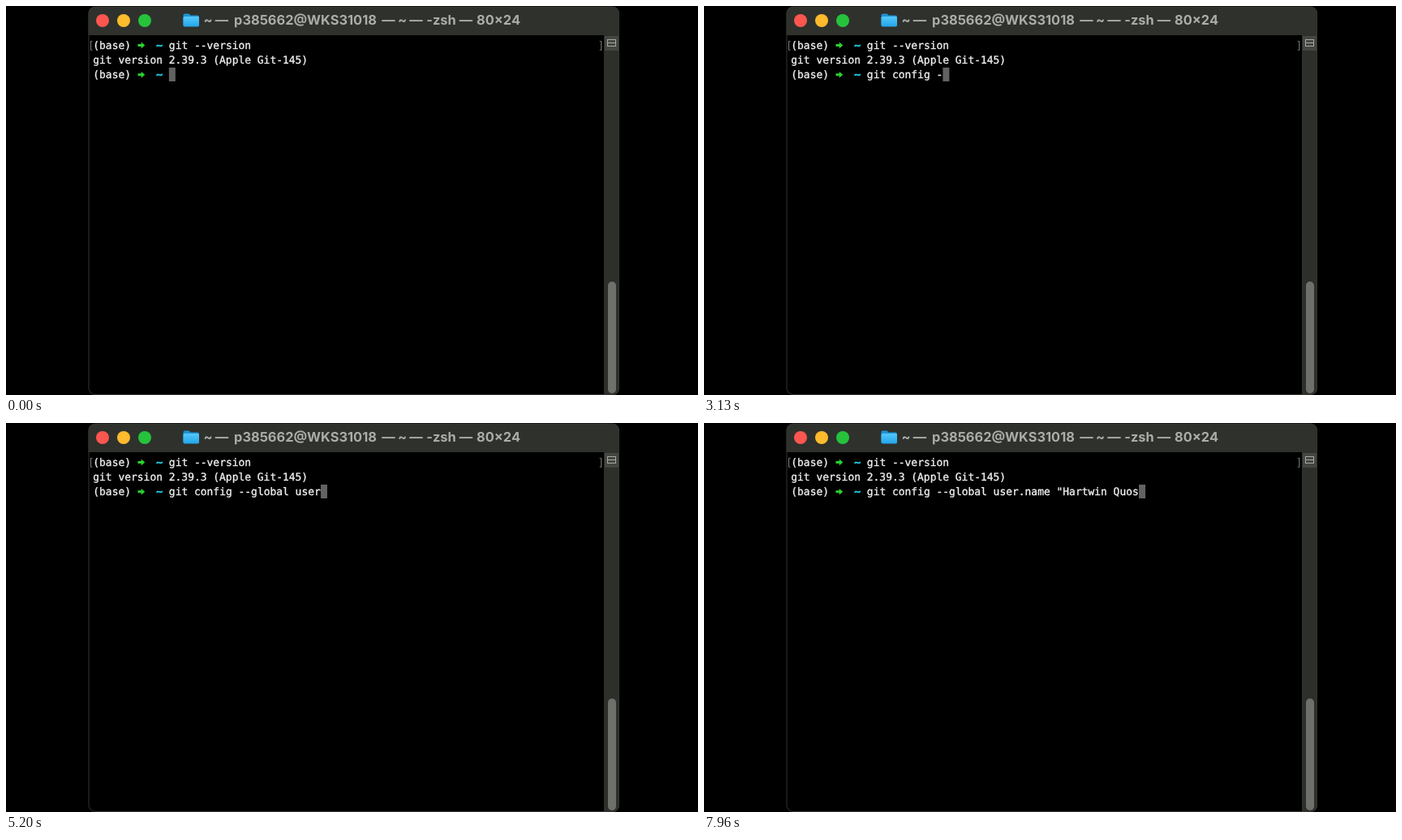
Write an HTML page that moves like this. It is 853 by 480 pixels and loops after 8000 ms.

```html
<!DOCTYPE html>
<html lang="en">
<head>
<meta charset="utf-8">
<title>Terminal</title>
<style>
  html, body { margin: 0; width: 100%; height: 100%; overflow: hidden; background: #000; }
  svg { display: block; width: 853px; height: 480px; }
  text { white-space: pre; text-rendering: geometricPrecision; }
  .term { font: 12.95px "DejaVu Sans Mono", monospace; fill: #f0f0f0; stroke: #f0f0f0; stroke-width: .35px; }
  .title { font: 700 16.4px Inter, sans-serif; fill: #abada9; text-anchor: middle; }
  .path { fill: #20d0e8; stroke: #20d0e8; stroke-width: .8px; }
  .mark { fill: #777; stroke: none; }
</style>
</head>
<body>
<svg viewBox="0 0 853 480">
  <defs>
    <clipPath id="frame"><rect x="101.500" y="1" width="654.500" height="479" rx="8"/></clipPath>
    <linearGradient id="blue" x2="0" y2="1">
      <stop stop-color="#55c8fa"/><stop offset="1" stop-color="#22a5ea"/>
    </linearGradient>
    <path id="arrow" d="M162.5 -6h4.2v-2.4l4.6 3.900-4.6 3.900v-2.400h-4.2z" fill="#2bd12f"/>
  </defs>

  <g clip-path="url(#frame)">
    <rect x="101" y="1" width="655" height="479" fill="#000"/>
    <rect x="101" y="1" width="655" height="35" fill="#2f312d"/>
    <rect x="737" y="36" width="19" height="444" fill="#2d2f2a"/>
    <rect x="738" y="37" width="17" height="18" fill="#444642"/>
    <g fill="none" stroke="#a6a8a4">
      <rect x="741.5" y="41.5" width="10" height="8"/>
      <path d="M742 45.5h9"/>
    </g>
    <rect x="742" y="340" width="10" height="138" rx="5" fill="#6e706c"/>
  </g>
  <rect x="102" y="1" width="653.500" height="478.500" rx="8" fill="none" stroke="#34362f"/>

  <circle cx="119" cy="18" r="8" fill="#fc5650"/>
  <circle cx="145" cy="18" r="8" fill="#fdbb2d"/>
  <circle cx="171" cy="18" r="8" fill="#26c23c"/>

  <path d="M218.5 11.5q0-2 2-2h5l2 2h8.5q2 0 2 2v9.5q0 2-2 2h-15.5q-2 0-2-2z" fill="#1d92d2"/>
  <rect x="218.5" y="13" width="19.5" height="12.5" rx="1.8" fill="url(#blue)"/>

  <g id="title" class="title"></g>
  <g id="screen" class="term">
    <text class="mark" x="101" y="53">[</text>
    <text class="mark" x="729.5" y="53">]</text>
    <text x="107.3" y="71">git version 2.39.3 (Apple Git-145)</text>
  </g>
  <rect id="cursor" y="76" width="8" height="17" fill="#626262"/>
</svg>
<script>
const LOOP = 8000, CELL = 7.796, LEFT = 107.3, INPUT = LEFT + 12 * CELL;
const NS = 'http://www.w3.org/2000/svg';
const byId = id => document.getElementById(id);

function addText(parent, x, y, str, cls) {
  const el = document.createElementNS(NS, 'text');
  el.setAttribute('x', x);
  el.setAttribute('y', y);
  if (cls) el.setAttribute('class', cls);
  el.textContent = str;
  parent.append(el);
  return el;
}

function addPrompt(y, command) {
  const screen = byId('screen');
  addText(screen, LEFT, y, '(base)');
  const arrow = document.createElementNS(NS, 'use');
  arrow.setAttribute('href', '#arrow');
  arrow.setAttribute('y', y);
  arrow.setAttribute('stroke', 'none');
  screen.append(arrow);
  addText(screen, LEFT + 10 * CELL, y, '~', 'path');
  return addText(screen, INPUT, y, command);
}

[[249, '~'], [266, '—'], [369, 'p385662@WKS31018'], [471.5, '—'], [488.5, '~'],
 [505.5, '—'], [536.5, '-zsh'], [567, '—'], [607, '80×24']]
  .forEach(([x, str]) => addText(byId('title'), x, 23.3, str));

addPrompt(53, 'git --version');
const input = addPrompt(89.3, '');

// Bursts of typing: first key, last key, number of keys
const bursts = [
  [1460, 2000, 7], [2100, 2260, 3], [2600, 2600, 1], [3130, 3260, 2],
  [3500, 3560, 2], [3700, 3830, 3], [4000, 4000, 1], [4260, 4260, 1],
  [4500, 4860, 5], [5200, 5330, 2], [5500, 5760, 4], [6060, 6060, 1],
  [6400, 6400, 1], [6600, 6600, 1], [6800, 7000, 4], [7230, 7300, 2],
  [7500, 7500, 1], [7700, 7960, 4]
];
const times = bursts.flatMap(([from, to, n]) =>
  Array.from({ length: n }, (_, i) => from + (n > 1 ? (to - from) * i / (n - 1) : 0)));

// \b is a backspace after a slip
const keys = 'git config --global usern\b.name "Hartwin Quos';
const states = [''];
for (const key of keys) {
  const line = states.at(-1);
  states.push(key === '\b' ? line.slice(0, -1) : line + key);
}

let shown = -1;
function draw(now) {
  const t = now % LOOP;
  const count = times.filter(at => at <= t).length;
  if (count !== shown) {
    shown = count;
    input.textContent = states[count];
    byId('cursor').setAttribute('x', INPUT + states[count].length * CELL);
  }
}

const start = performance.now();
function tick() {
  draw(performance.now() - start);
  requestAnimationFrame(tick);
}
tick();
</script>
</body>
</html>
```
